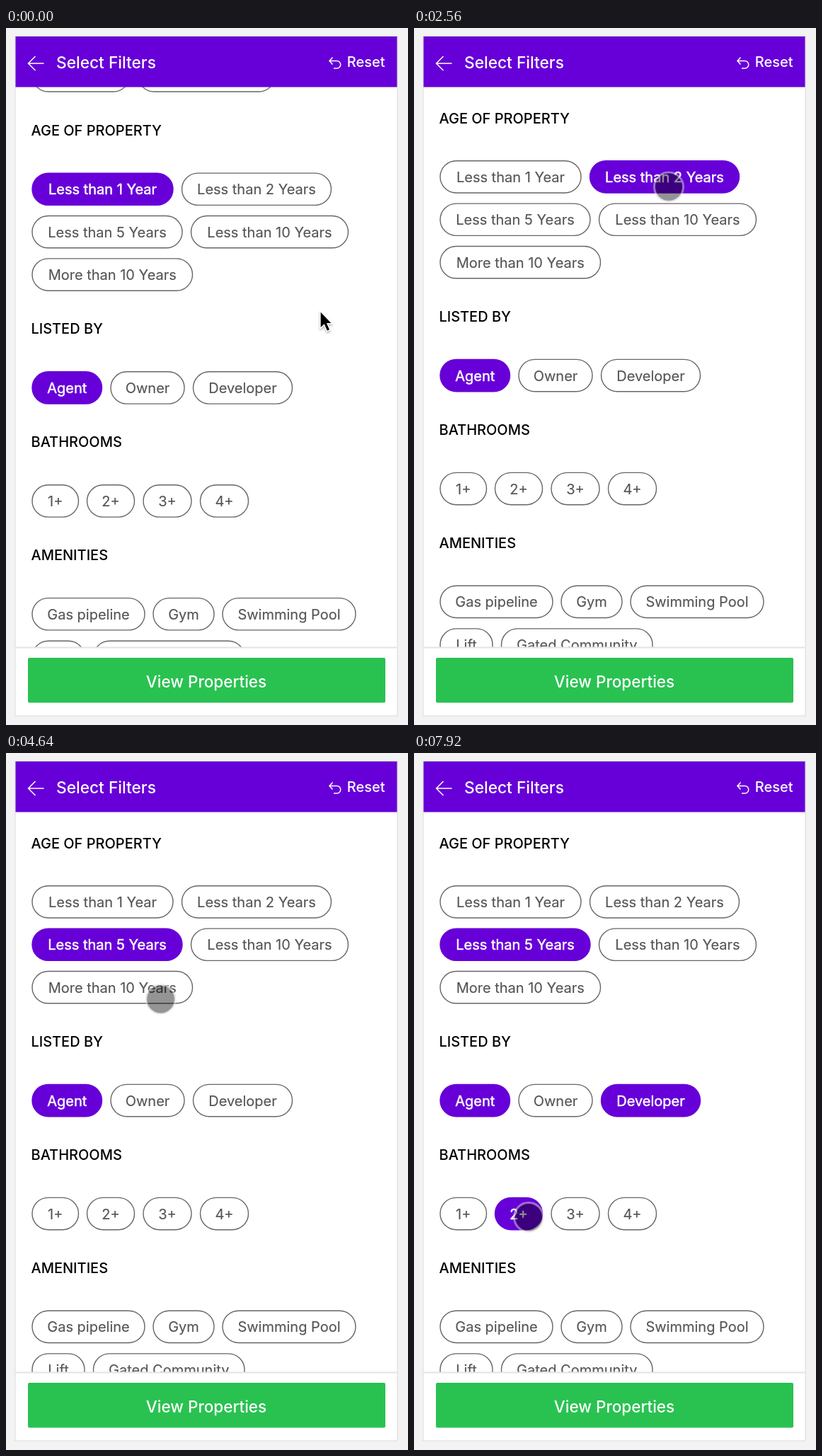
Recreate the animation shown at these times as an HTML page. Size 568 px wide and 985 px high, loop 8 s.

```html
<!DOCTYPE html>
<html lang="en">
<head>
<meta charset="utf-8">
<title>Select Filters</title>
<style>
  html, body { margin: 0; width: 100%; height: 100%; overflow: hidden; background: #f3f3f3; }
  svg { display: block; width: 568px; height: 985px; }
  text { font-family: Inter, Roboto, sans-serif; font-size: 20px; font-weight: 500; }
  .mid { text-anchor: middle; }
  .bar text, .button { fill: #fff; }
  .icon { fill: none; stroke: #fff; stroke-width: 1.5; }
  .chip rect { fill: #fff; stroke: #666; stroke-width: 1.4; }
  .chip text { fill: #555; font-weight: 400; stroke: #555; stroke-width: .15; }
  .chip.on rect { fill: #6700d8; stroke: #6700d8; }
  .chip.on text { fill: #fff; stroke: #fff; stroke-width: .5; }
</style>
</head>
<body>
<svg viewBox="0 0 568 985">
  <defs>
    <clipPath id="view"><rect x="14" y="83" width="538" height="792"/></clipPath>
    <filter id="shade" x="-50%" y="-50%" width="200%" height="200%">
      <feDropShadow dx="0" dy="2" stdDeviation="1.5" flood-opacity=".35"/>
    </filter>
  </defs>
  <rect x="13" y="11.5" width="540" height="960.5" fill="#fff" stroke="#d9d9d9"/>
  <g clip-path="url(#view)"><g id="list"></g></g>

  <g class="bar">
    <rect x="13.5" y="12" width="539" height="71.5" fill="#6700d8"/>
    <path class="icon" d="M53.500 50H31.500M41.500 40L31.500 50L41.500 60"/>
    <text x="71" y="57" style="font-size:22.700px">Select Filters</text>
    <path class="icon" d="M457 46.500H467.500A5.200 5.200 0 0 1 467.500 57H463M461.500 41.500L457 46.500L461.500 51.500"/>
    <text x="535.500" y="55" text-anchor="end">Reset</text>
  </g>

  <path d="M14 875.500H552" stroke="#e4e4e4" stroke-width="2"/>
  <rect x="31" y="890" width="505" height="63.500" rx="2" fill="#29c251"/>
  <text class="button mid" x="283" y="931.500" style="font-size:22.500px">View Properties</text>

  <path id="arrow" d="M444 400V424.500L449.500 419.300L453.500 428.500L457.800 426.600L453.900 417.700H461Z"
        stroke="#fff" stroke-width="1.300" filter="url(#shade)"/>
  <g id="touch">
    <circle r="20" fill="#000" fill-opacity=".42"/>
    <circle r="20.500" fill="none" stroke="#ddd" stroke-opacity=".5" stroke-width="3"/>
  </g>
</svg>
<script>
const LOOP = 8000, STEP = 80;
const $ = id => document.getElementById(id);
const list = $('list'), chips = {};

function add(tag, attrs, parent, label = '') {
  const el = document.createElementNS('http://www.w3.org/2000/svg', tag);
  for (const key in attrs) el.setAttribute(key, attrs[key]);
  el.textContent = label;
  return parent.appendChild(el);
}

function title(y, label) {
  add('text', { x: 35.5, y }, list, label);
}

// Each item is [label, left, right].
function row(y, ...items) {
  for (const [label, x, right] of items) {
    const g = add('g', { class: 'chip' }, list);
    add('rect', { x, y, width: right - x, height: 45.3, rx: 22.65 }, g);
    add('text', { class: 'mid', x: (x + right) / 2, y: y + 30.2 }, g, label);
    chips[label] = g;
  }
}

row(27.3, ['', 37, 174.5], ['', 186.5, 380]);
title(134.5, 'AGE OF PROPERTY');
row(187.7, ['Less than 1 Year', 37, 236], ['Less than 2 Years', 248.5, 459.5]);
row(248.1, ['Less than 5 Years', 37, 249], ['Less than 10 Years', 261.5, 483.5]);
row(308.5, ['More than 10 Years', 37, 263.5]);
title(415, 'LISTED BY');
row(468.4, ['Agent', 37, 135.5], ['Owner', 148, 252], ['Developer', 264.5, 404.5]);
title(575, 'BATHROOMS');
row(628.4, ['1+', 37, 102.5], ['2+', 114.5, 181.5], ['3+', 194, 262], ['4+', 274.5, 342.5]);
title(734.5, 'AMENITIES');
row(788.2, ['Gas pipeline', 37, 196], ['Gym', 208, 294], ['Swimming Pool', 306, 494]);
row(848.9, ['Lift', 37, 111], ['Gated Community', 123.5, 337]);

// Chip, time switched on, time switched off.
const picks = [
  ['Less than 1 Year', 0, 2400],
  ['Less than 2 Years', 2400, 3840],
  ['Less than 5 Years', 3840, LOOP],
  ['Agent', 0, LOOP],
  ['Developer', 5280, LOOP],
  ['3+', 6240, 7680],
  ['2+', 7680, LOOP]
];

// Pointer moves: start time, end time, target x, target y.
const WAKE = 1360;
const moves = [
  [WAKE, 2160, 360, 224.5],
  [2720, 3600, 164, 273],
  [4320, 5120, 319, 486],
  [5520, 6080, 216, 656],
  [6960, 7440, 162, 656]
];

function pointer(t) {
  let x = 446, y = 402;
  for (const [from, to, toX, toY] of moves) {
    const p = Math.min(1, Math.max(0, (t - from) / (to - from)));
    const k = p * p * (3 - 2 * p);
    x += (toX - x) * k;
    y += (toY - y) * k;
  }
  return `translate(${x} ${y})`;
}

function draw(now) {
  const t = Math.floor(now % LOOP / STEP) * STEP;
  const scroll = 17.4 * Math.max(0, 1 - t / 400) ** 2;
  list.setAttribute('transform', `translate(0 ${scroll})`);
  for (const [label, on, off] of picks)
    chips[label].classList.toggle('on', t >= on && t < off);
  $('arrow').style.display = t < WAKE ? '' : 'none';
  $('touch').style.display = t < WAKE ? 'none' : '';
  $('touch').setAttribute('transform', pointer(t));
}

const start = performance.now();
function tick() {
  draw(performance.now() - start);
  requestAnimationFrame(tick);
}
tick();
</script>
</body>
</html>
```
